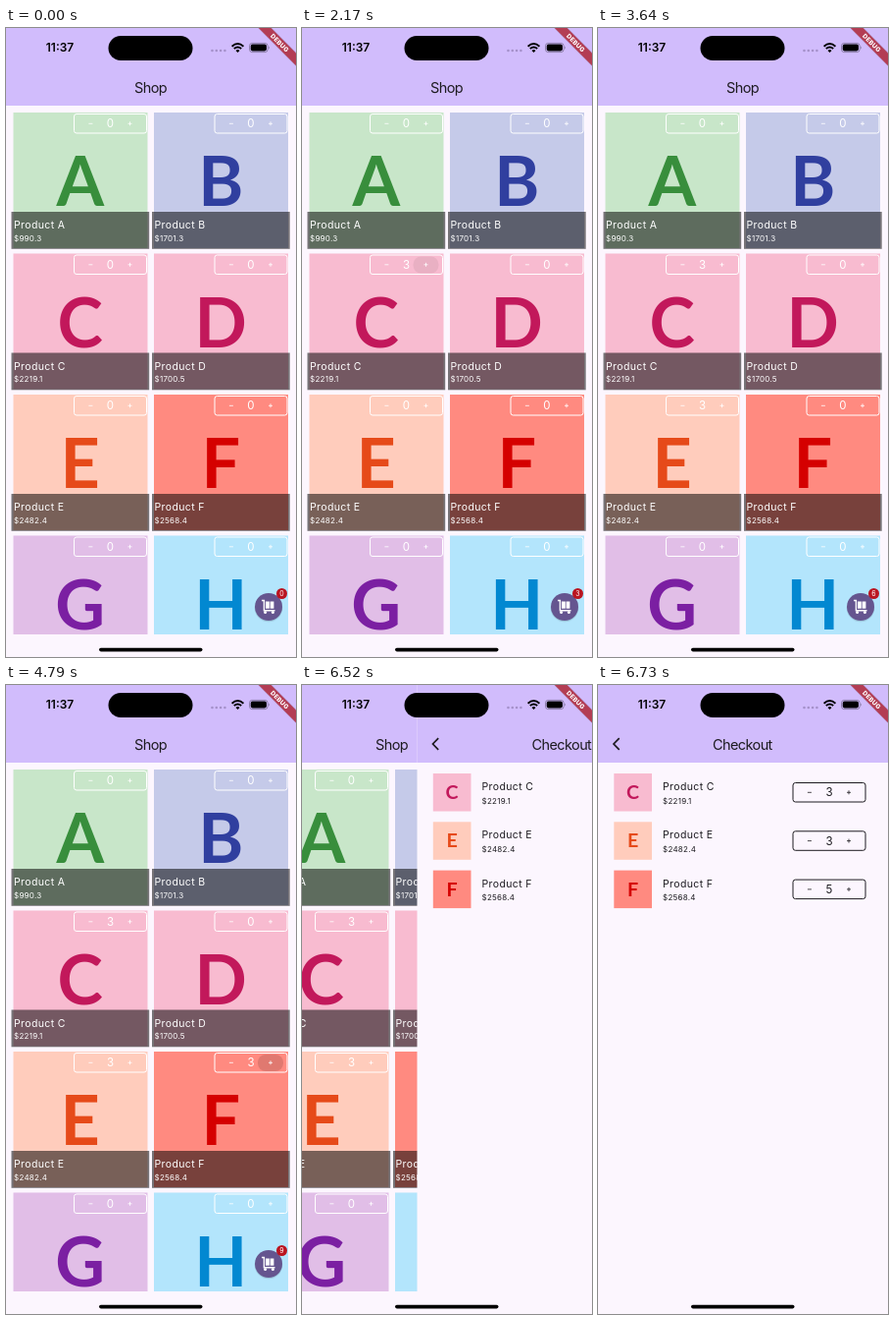
Write an HTML page that moves like this. It is 296x640 px and loops after 8 s.

```html
<!DOCTYPE html>
<html lang="en">
<head>
<meta charset="utf-8">
<title>Shop</title>
<style>
html, body { margin: 0; width: 100%; height: 100%; overflow: hidden; background: #fcf6fe; }
svg { display: block; width: 296px; height: 640px; font-family: Inter, Roboto, sans-serif; }
.letter { font: 700 70px Lato, sans-serif; text-anchor: middle; }
.thumb { font-size: 19.7px; }
.name { font-size: 10.5px; letter-spacing: .37px; }
.price { font-size: 8px; letter-spacing: .25px; }
.title { font-size: 14.5px; letter-spacing: -.6px; fill: #1d1b20; }
.mid { text-anchor: middle; }
.count { font-size: 11.5px; text-anchor: middle; }
.time { font-size: 12px; font-weight: 600; }
.debug { font-size: 6.4px; font-weight: 800; letter-spacing: .2px; text-anchor: middle; fill: #fff; }
.badge { font-size: 7px; text-anchor: middle; fill: #fff; }
</style>
</head>
<body>
<svg id="stage" viewBox="0 0 296 640"></svg>
<script>
const LOOP = 8000;
const PITCH = 143.5;

// letter, price, tile colour, letter colour
const products = [
  ['A', '990.3', '#c8e6c9', '#388e3c'],
  ['B', '1701.3', '#c5cae9', '#303f9f'],
  ['C', '2219.1', '#f8bbd0', '#c2185b'],
  ['D', '1700.5', '#f8bbd0', '#c2185b'],
  ['E', '2482.4', '#ffccbc', '#e64a19'],
  ['F', '2568.4', '#ff8a80', '#d50000'],
  ['G', '', '#e1bee7', '#7b1fa2'],
  ['H', '', '#b3e5fc', '#0288d1']
];

// Each tap: time, product
const taps = [
  [1370, 'C'], [1600, 'C'], [1830, 'C'],
  [2940, 'E'], [3160, 'E'], [3380, 'E'],
  [4470, 'F'], [4690, 'F'], [4790, 'F'], [5000, 'F'], [5150, 'F']
];

// Touch highlights: start, end, product, opacity
const touches = [
  [1260, 2060, 'C', .12], [2060, 2940, 'C', .06],
  [2940, 3540, 'E', .12], [3540, 3640, 'E', .06],
  [4470, 5260, 'F', .12], [5260, 5390, 'F', .06]
];

// Page change: start, shop offset, checkout offset
const slides = [[0, 0, 296], [6520, -56, 117.5], [6630, -91, 25], [6730, -98, 0]];

const rect = (x, y, w, h, fill, extra = '') =>
  `<rect x="${x}" y="${y}" width="${w}" height="${h}" fill="${fill}" ${extra}/>`;
const text = (x, y, cls, value, extra = '') =>
  `<text x="${x}" y="${y}" class="${cls}" ${extra}>${value}</text>`;
const path = (d, extra) => `<path d="${d}" ${extra}/>`;

function stepper(x, y, colour, letter) {
  const sign = `stroke="${colour}" stroke-width=".8" fill="none"`;
  return rect(x + .5, y + .5, 74, 19.5, 'none', `rx="2.5" stroke="${colour}"`) +
    path(`M${x + 15.4} ${y + 10.3}h4`, sign) +
    path(`M${x + 55.5} ${y + 10.3}h4m-2-2v4`, sign) +
    text(x + 37.5, y + 14.4, 'count', 0, `fill="${colour}" data-count="${letter}"`);
}

function tile([letter, price, bg, ink], i) {
  const x = i % 2 * PITCH, y = Math.floor(i / 2) * PITCH;
  const footer = price && rect(5.5, 187, 140.7, 37.8, '#000', 'opacity=".53"') +
    `<g fill="#fff">${text(8, 204, 'name', 'Product ' + letter)}${text(8, 216.7, 'price', '$' + price)}</g>`;
  return `<g transform="translate(${x} ${y})">` +
    rect(7.5, 86, 137, 138, bg) +
    text(75.7, 181, 'letter', letter, `fill="${ink}"`) + footer +
    rect(113.5, 89, 26, 17, '#000', `rx="8" opacity="0" data-touch="${letter}"`) +
    stepper(69, 87, '#fff', letter) + '</g>';
}

function line([letter, price, bg, ink], i) {
  return `<g transform="translate(0 ${i * 49.3})" fill="#1d1b20">` +
    rect(16.3, 90, 38.7, 38.5, bg) +
    text(35.6, 116.2, 'letter thumb', letter, `fill="${ink}"`) +
    text(66, 107, 'name', 'Product ' + letter) +
    text(66, 120.8, 'price', '$' + price) +
    stepper(198.5, 99, '#1d1b20', letter) + '</g>';
}

const header = rect(0, 0, 296, 79, '#d1bcfc');

const cart = path('M261 582.5h2.4v10.2h11.1', 'fill="none" stroke="#fff" stroke-width="1.4"') +
  rect(265, 583.5, 3.8, 7.2, '#fff') + rect(269.6, 583.5, 3.8, 7.2, '#fff') +
  '<circle cx="264.6" cy="594.6" r="1.5" fill="#fff"/><circle cx="272.4" cy="594.6" r="1.5" fill="#fff"/>';

const shop = rect(0, 0, 296, 640, '#fcf6fe') + header +
  text(131, 65.8, 'title', 'Shop') +
  `<g clip-path="url(#grid)">${products.map(tile).join('')}</g>` +
  '<circle cx="268" cy="590" r="14.3" opacity=".12"/><circle cx="268" cy="589" r="14" fill="#65558f"/>' + cart +
  rect(276, 570, 11, 11, '#ba1420', 'rx="5.5" id="pill"') +
  text(281.5, 578.1, 'badge', 0, 'id="total"');

const checkout = rect(0, 0, 296, 640, '#fcf6fe') + header +
  path('M21.7 54.2L16 60l5.7 5.8', 'fill="none" stroke="#1d1b20" stroke-width="1.7"') +
  text(117, 65.8, 'title', 'Checkout') +
  products.filter(p => 'CEF'.includes(p[0])).map(line).join('');

const dots = [210.5, 214.8, 219.1, 223.4]
  .map(x => `<circle cx="${x}" cy="23" r="1.3" fill="#a591ca"/>`).join('');

const wifi = path('M230.6 18.7q5.9-5.2 11.8 0M232.8 21.1q3.7-3.1 7.4 0', 'fill="none" stroke="#000" stroke-width="1.9"') +
  path('M236.5 25l-2-2.1q2-1.6 4 0z', '');

const battery = rect(248.5, 15.4, 18.6, 9.2, 'none', 'rx="2.8" stroke="#000" stroke-width=".8" opacity=".4"') +
  rect(249.7, 16.6, 16.2, 6.8, '#000', 'rx="1.8"') +
  path('M268.2 18.5q1.4 1.5 0 3z', 'opacity=".45"');

const ribbon = '<g transform="translate(296 0) rotate(45)">' +
  rect(-40, 17.3, 80, 10.2, '#000', 'opacity=".12"') +
  rect(-40, 18, 80, 9, '#b2202f', 'opacity=".78"') +
  text(-1, 24.8, 'debug', 'DEBUG') + '</g>';

const stage = document.getElementById('stage');
stage.innerHTML = '<clipPath id="grid"><rect y="79" width="296" height="538"/></clipPath>' +
  `<g id="shop">${shop}</g><g id="checkout">${checkout}</g>` +
  text(55, 24.3, 'time mid', '11:37') +
  rect(104.5, 8, 86, 25, '#000', 'rx="12.5"') +
  dots + wifi + battery + ribbon +
  rect(95, 630.8, 105.5, 3.6, '#000', 'rx="1.8"');

const find = id => document.getElementById(id);
const counts = stage.querySelectorAll('[data-count]');
const lights = stage.querySelectorAll('[data-touch]');

function draw(t) {
  const done = taps.filter(tap => tap[0] <= t);
  counts.forEach(el => {
    el.textContent = done.filter(tap => tap[1] === el.dataset.count).length;
  });
  const touch = touches.find(([from, to]) => from <= t && t < to);
  lights.forEach(el => {
    el.setAttribute('opacity', touch && touch[2] === el.dataset.touch ? touch[3] : 0);
  });

  const wide = done.length > 9;
  find('total').textContent = done.length;
  find('total').setAttribute('x', wide ? 282.8 : 281.5);
  find('pill').setAttribute('width', wide ? 13.6 : 11);

  const [, back, front] = slides.filter(s => s[0] <= t).pop();
  find('shop').setAttribute('transform', `translate(${back} 0)`);
  find('checkout').setAttribute('transform', `translate(${front} 0)`);
}

const start = performance.now();
function tick() {
  draw((performance.now() - start) % LOOP);
  requestAnimationFrame(tick);
}
tick();
</script>
</body>
</html>
```
